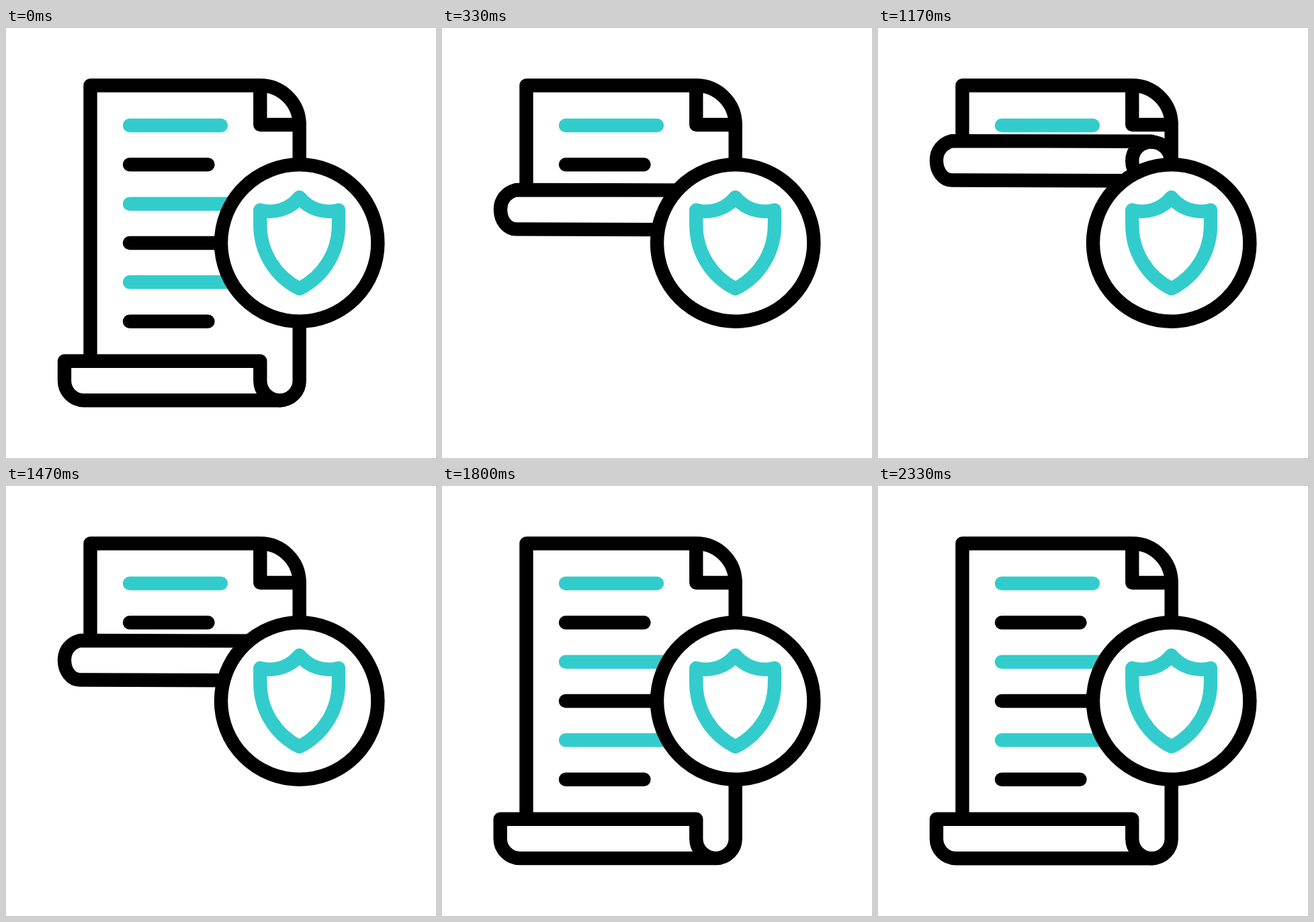
An HTML page for the animation above (3 s loop, 640 px wide and 640 px high).

```html
<!DOCTYPE html>
<html lang="en">
<head>
<meta charset="utf-8">
<title>Protected document</title>
<style>
  html, body { margin: 0; height: 100%; overflow: hidden; background: #fff; }
  svg { display: block; width: 100%; height: 100%; fill: none; stroke: #000; stroke-width: 20.4; stroke-linecap: round; stroke-linejoin: round; }
  .accent { stroke: #3cc; }
</style>
</head>
<body>
<svg viewBox="0 0 640 640">
  <clipPath id="above"><rect id="page" width="640" height="496"/></clipPath>
  <g clip-path="url(#above)">
    <path d="M125.5 520V85.5H378.3A58.4 58.4 0 0 1 436.7 144H378.3V85.5"/>
    <path class="accent" d="M184 145H320M184 261.7H350M184 378.3H350"/>
    <path d="M184 203.3H300.5M184 320H350M184 436.7H300.5"/>
  </g>
  <path id="edge"/>
  <path id="roll"/>
  <circle cx="436.7" cy="320" r="116.7" fill="#fff"/>
  <path class="accent" d="M436.7 252C423 269 400 277 378.3 271V293C378.3 334 401 370 436.7 388C472.4 370 495 334 495 293V271C473.4 277 450.4 269 436.7 252Z"/>
</svg>
<script>
const LOOP = 3000, BOTTOM = 495.8, TOP = 167;
const [page, edge, roll] = ['page', 'edge', 'roll'].map(id => document.getElementById(id));
const clamp = v => Math.min(1, Math.max(0, v));

function bezier(x1, y1, x2, y2) {
  const at = (a, b, s) => 3 * a * s * (1 - s) ** 2 + 3 * b * s * s * (1 - s) + s ** 3;
  return x => {
    let low = 0, high = 1;
    for (let i = 0; i < 30; i++) {
      const mid = (low + high) / 2;
      if (at(x1, x2, mid) < x) low = mid; else high = mid;
    }
    return at(y1, y2, low);
  };
}
const rise = bezier(.65, .03, .75, .52);
const fall = bezier(.6, .03, .75, .52);

function draw(t) {
  const falling = t > 1100;
  const drop = falling ? fall(clamp((t - 1140) / 660)) : rise(clamp((700 - t) / 660));
  const settle = Math.sin(Math.PI * clamp((t - 1800) / 530) ** .7);
  const y = TOP + (BOTTOM - TOP) * drop - 2 * settle;

  // m: 0 is the open scroll foot, 1 the rounded roll
  const m = clamp((BOTTOM - 2 * settle - y) / 200);
  const bulge = falling ? 20 * m * (1 - m) + 8 * settle : 0;
  const left = 87 - bulge, corner = left + 23 * m, end = 378.3 + 29 * m;
  const mid = y + 29.2, low = y + 58.4;

  page.setAttribute('height', y);
  edge.setAttribute('d', `M436.7 144V${mid}A29.2 29.2 0 0 1 407.5 ${low}` +
    (y < 300 ? `M407.5 ${y + 1.5}A29 29 0 0 1 436 ${mid + 1}` : ''));
  roll.setAttribute('d', `M${end} ${y + .6 * m}L${corner} ${y}
    C${corner - 14 * m} ${y + 4 * m} ${left} ${y + 14} ${left} ${mid}
    C${left} ${y + 45.3} ${100 - 3 * m} ${low} ${116 - 6 * m} ${low}
    L407.5 ${low + m}A29.2 29.2 0 0 1 378.3 ${mid}
    C378.3 ${y + 13} ${end - 16 * m} ${y + 1.5 * m} ${end} ${y + 1.5 * m}`);
}

const start = performance.now();
function tick() {
  draw((performance.now() - start) % LOOP);
  requestAnimationFrame(tick);
}
tick();
</script>
</body>
</html>
```
